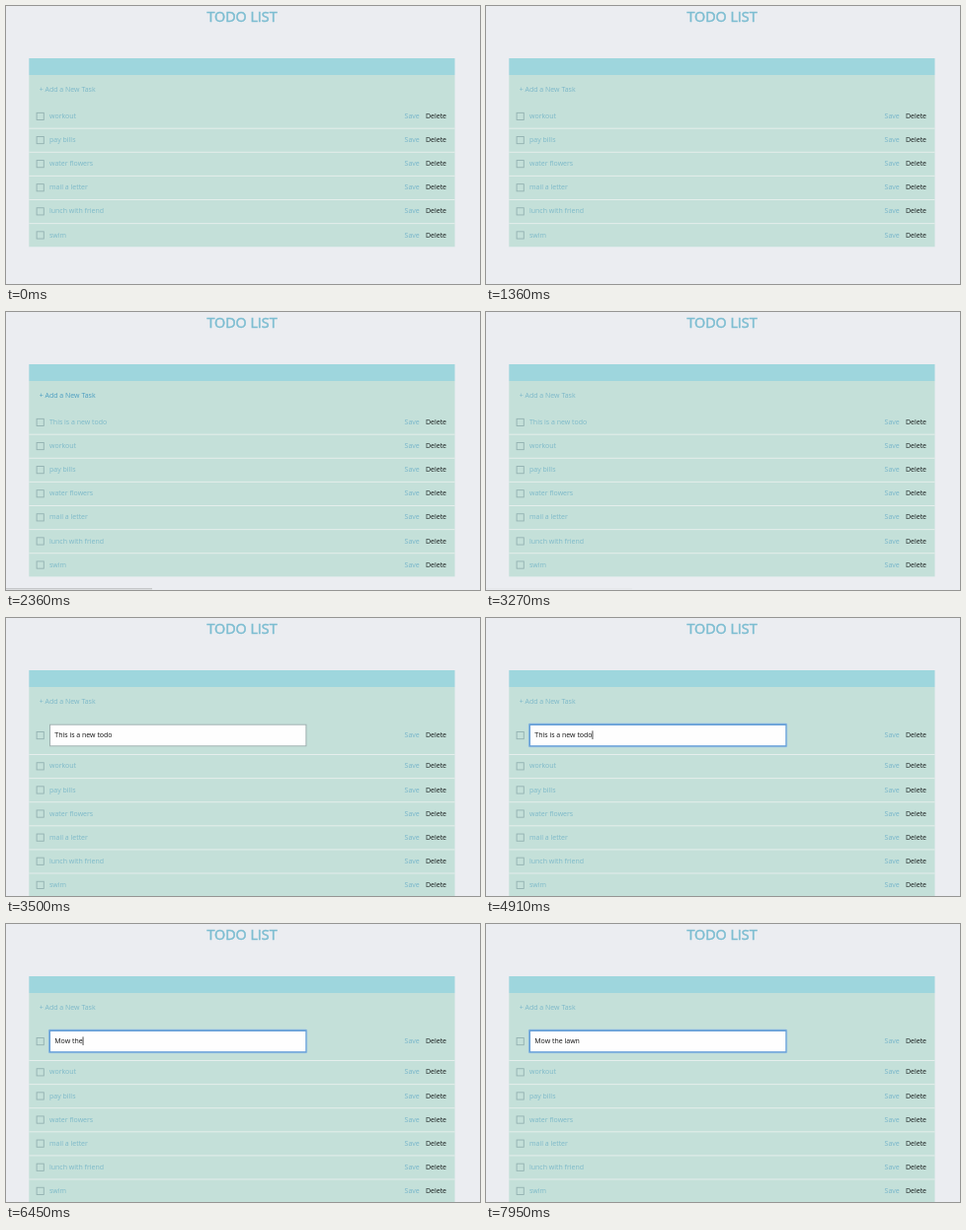
These frames come from a looping animation (480x282 px, 8 s). An HTML page with a canvas:

```html
<!DOCTYPE html>
<html lang="en">
<head>
<meta charset="utf-8">
<title>Todo list</title>
<style>
html, body { margin: 0; width: 100%; height: 100%; overflow: hidden; background: #ebedf1; }
canvas { display: block; width: 480px; height: 282px; }
</style>
</head>
<body>
<canvas id="stage" width="480" height="282"></canvas>
<script>
const ctx = document.getElementById('stage').getContext('2d');
const LOOP = 8000;
const FAMILY = '"Open Sans", "Noto Sans", sans-serif';
const TASKS = ['workout', 'pay bills', 'water flowers', 'mail a letter', 'lunch with friend', 'swim'];
const OLD = 'This is a new todo', NEW = 'Mow the lawn';
const LEFT = 23.3, RIGHT = 454.5, ROW = 24.1, EDIT_ROW = 38.4, LIST_TOP = 99.7;

// Moments in ms
const HOVER_IN = 1330, HOVER_OUT = 2910, ADD = 2360, EDIT = 3500, FOCUS = 4450;
const ERASE = 5140, ERASE_STEP = 41;
const KEYS = [5950, 6030, 6110, 6190, 6270, 6345, 6420, 6600, 6800, 6920, 7040, 7160];

const clamp = v => Math.max(0, Math.min(1, v));
const smooth = v => v * v * (3 - 2 * v);

function rect(x, y, w, h, color) {
  ctx.fillStyle = color;
  ctx.fillRect(x, y, w, h);
}

function text(str, x, y, color, size = 7) {
  ctx.font = `${size}px ${FAMILY}`;
  ctx.fillStyle = color;
  ctx.fillText(str, x, y);
}

function mix(a, b, k) {
  return `rgb(${a.map((v, i) => Math.round(v + (b[i] - v) * k)).join()})`;
}

function typing(t) {
  if (t < KEYS[0]) {
    const gone = t < ERASE ? 0 : Math.floor((t - ERASE) / ERASE_STEP) + 1;
    const last = gone ? ERASE + (Math.min(gone, OLD.length) - 1) * ERASE_STEP : FOCUS;
    return { value: OLD.slice(0, Math.max(0, OLD.length - gone)), last };
  }
  const count = KEYS.filter(k => k <= t).length;
  return { value: NEW.slice(0, count), last: KEYS[count - 1] };
}

function drawInput(t) {
  const focused = t >= FOCUS;
  const { value, last } = typing(t);
  if (focused) {
    ctx.fillStyle = '#a9cde3';
    ctx.beginPath();
    ctx.roundRect(42.8, 106.6, 262.4, 24.7, 1.5);
    ctx.fill();
    rect(43.5, 107.3, 261, 23.3, '#659fd8');
    rect(45, 109, 258.3, 20.2, '#fefefe');
  } else {
    rect(44, 107.7, 260.4, 22.6, '#9fb0b0');
    rect(45, 108.7, 258.4, 20.6, '#fefefe');
  }
  text(value, 49.3, 121.3, '#111');
  if (focused && (t - last) % 1000 < 500) {
    rect(49.3 + ctx.measureText(value).width, 114.4, 0.7, 8.6, '#000');
  }
}

function drawRow(label, top, height) {
  const mid = top + height / 2;
  ctx.strokeStyle = '#93b1b1';
  ctx.lineWidth = 0.9;
  ctx.strokeRect(31.1, mid - 3.4, 7.2, 7.2);
  if (label) text(label, 44, mid + 2.3, '#7db9c9');
  text('Save', 403.6, mid + 2.3, '#77b5ca');
  text('Delete', 424.9, mid + 2.3, '#161a1a');
}

function drawList(t) {
  const editing = t >= EDIT;
  const rows = t >= ADD ? [OLD, ...TASKS] : TASKS;
  const height = i => editing && i === 0 ? EDIT_ROW : ROW;
  const total = rows.reduce((sum, _, i) => sum + height(i), 0);
  rect(LEFT, 70, RIGHT - LEFT, LIST_TOP + total - 70, '#c4e0d9');
  let top = LIST_TOP;
  rows.forEach((label, i) => {
    drawRow(editing && i === 0 ? '' : label, top, height(i));
    top += height(i);
    if (i < rows.length - 1) rect(LEFT, top - 0.1, RIGHT - LEFT, 1, '#e5eeec');
  });
  if (editing) drawInput(t);
}

function drawStatus(t) {
  const alpha = t < 2050 || t >= EDIT ? 0 : t < 2090 ? 0.5 : t < 3270 ? 1 : 0.15;
  ctx.globalAlpha = alpha;
  rect(0, 280, 148, 1, '#c5c7c9');
  rect(0, 281, 148, 1, '#dcdee0');
  ctx.globalAlpha = 1;
}

function draw(t) {
  rect(0, 0, 480, 282, '#ebedf1');
  ctx.textBaseline = 'alphabetic';

  ctx.textAlign = 'center';
  text('TODO LIST', 239, 16, '#7cbdd1', 14.3);
  ctx.strokeStyle = '#7cbdd1';
  ctx.lineWidth = 0.5;
  ctx.strokeText('TODO LIST', 239, 16);
  ctx.textAlign = 'left';

  drawList(t);
  rect(LEFT, 53, RIGHT - LEFT, 17, '#9ed6dd');
  const hover = t < HOVER_OUT ? smooth(clamp((t - HOVER_IN) / 320)) : 0;
  text('+ Add a New Task', 33.7, 87, mix([125, 184, 201], [76, 158, 193], hover));
  drawStatus(t);
}

const start = performance.now();
function frame() {
  draw((performance.now() - start) % LOOP);
  requestAnimationFrame(frame);
}
frame();
</script>
</body>
</html>
```
